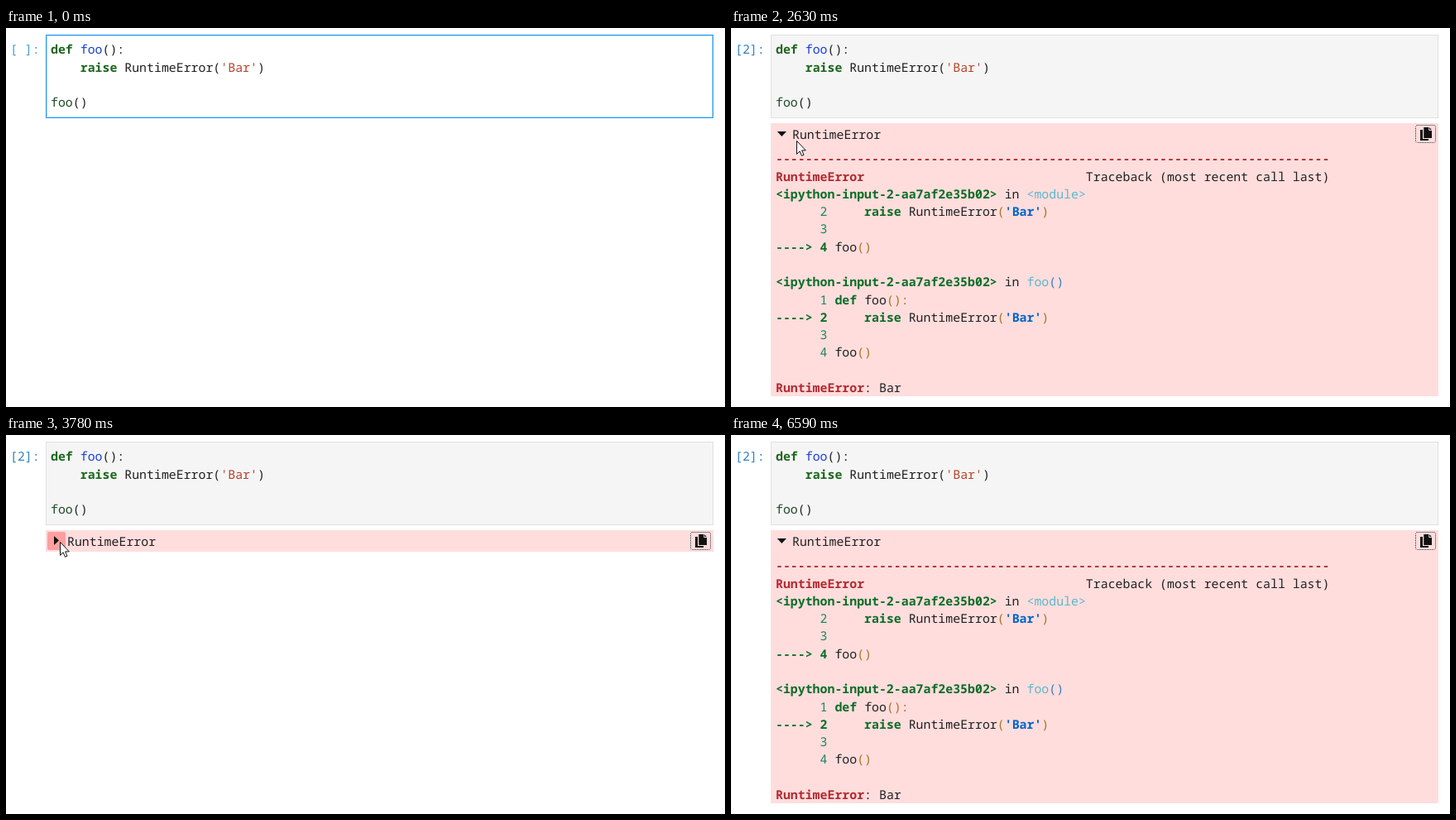
Write an HTML page that moves like this. It is 869 by 458 pixels and loops after 6.94 s.

```html
<!DOCTYPE html>
<html lang="en">
<head>
<meta charset="utf-8">
<title>Collapsible traceback</title>
<style>
html, body { margin: 0; width: 100%; height: 100%; overflow: hidden; background: #fff; }
svg { display: block; }
text { font: 14.88px "Noto Sans Mono", monospace; white-space: pre; fill: #212121; text-rendering: geometricPrecision; }
.k { fill: #1c661c; font-weight: 700; }
.d { fill: #1c3fd8; }
.v { fill: #1f4a2a; }
.s { fill: #b5432b; }
.r { fill: #b22b31; font-weight: 700; }
.g { fill: #0a6e27; font-weight: 700; }
.n { fill: #1c8560; }
.c { fill: #5cb8cc; }
.b { fill: #0065ca; font-weight: 700; }
.p { fill: #2f7fc0; }
.y { fill: #a8741c; }
</style>
</head>
<body>
<svg id="stage" width="869" height="458" viewBox="0 0 869 458">
  <rect id="cell" x="48.5" y="8.5" width="806" height="100"/>
  <rect id="glow" x="49.5" y="9.5" width="804" height="98" fill="none" stroke="#2196f3" stroke-opacity=".3"/>
  <text id="prompt" x="5" y="31"></text>
  <g id="code"></g>
  <g id="output">
    <rect id="panel" x="48" y="115" width="807" height="330" fill="#fdd"/>
    <rect id="toggle" x="50" y="117" width="22" height="22" rx="2"/>
    <path id="mark" fill="#111"/>
    <text x="74" y="134">RuntimeError</text>
    <rect id="copy" x="827.5" y="117.5" width="24" height="21" rx="2" stroke="#fff" stroke-opacity=".6"/>
    <rect x="827.5" y="117.5" width="24" height="21" rx="2" fill="none" stroke="#222" stroke-dasharray="1 1"/>
    <path d="M833 123h3v11h7v2h-10z" fill="#111"/>
    <path d="M837.3 120h6v4h3.7v9h-9.7z" fill="#111"/>
    <path d="M844 120l3 3h-3z" fill="#334"/>
    <g id="trace"></g>
  </g>
  <g id="arrow">
    <path d="M.5 .5V16.4L4.1 12.9L6.5 18.4L9 17.3L6.6 11.9H11.3Z" fill="#fff" stroke="#111"/>
  </g>
  <path id="beam" d="M-3.5 -7.5H-1Q0 -7.5 0 -6.5Q0 -7.5 1 -7.5H3.5M0 -6.5V6.5M-3.5 7.5H-1Q0 7.5 0 6.5Q0 7.5 1 7.5H3.5" fill="none" stroke="#111" stroke-width="1.3"/>
</svg>
<script>
const NS = "http://www.w3.org/2000/svg";
const LOOP = 6940;
const $ = id => document.getElementById(id);
const set = (id, attrs) => {
  for (const name in attrs) $(id).setAttribute(name, attrs[name]);
};
const show = (id, on) => set(id, { visibility: on ? "visible" : "hidden" });

// {x:text} gives the text class x.
function addLine(group, y, source) {
  const text = document.createElementNS(NS, "text");
  text.setAttribute("x", 54);
  text.setAttribute("y", Math.round(y));
  for (const m of source.matchAll(/\{(\w):([^}]*)\}|[^{]+/g)) {
    const span = document.createElementNS(NS, "tspan");
    if (m[1]) span.setAttribute("class", m[1]);
    span.textContent = m[1] ? m[2] : m[0];
    text.append(span);
  }
  $(group).append(text);
}

const code = [
  "{k:def} {d:foo}():",
  "    {k:raise} RuntimeError({s:'Bar'})",
  "",
  "{v:foo}()"
];
const raise = "    {g:raise} RuntimeError{y:(}{b:'Bar'}{y:)}";
const file = "{g:<ipython-input-2-aa7af2e35b02>} in ";
const trace = [
  "{r:" + "-".repeat(75) + "}",
  "{r:RuntimeError}" + " ".repeat(30) + "Traceback (most recent call last)",
  file + "{c:<module>}",
  "{n:      2} " + raise,
  "{n:      3}",
  "{g:----> 4} foo{y:()}",
  "",
  file + "{c:foo}{p:()}",
  "{n:      1} {g:def} foo{y:():}",
  "{g:----> 2} " + raise,
  "{n:      3}",
  "{n:      4} foo{y:()}",
  "",
  "{r:RuntimeError}: Bar"
];
code.forEach((s, i) => addLine("code", 31.4 + 21.28 * i, s));
trace.forEach((s, i) => addLine("trace", 163.3 + 21.28 * i, s));

// Smooth curve through evenly timed points.
function along(points, p) {
  const last = points.length - 1;
  const u = Math.min(Math.max(p, 0), 1) * last;
  const i = Math.min(Math.floor(u), last - 1);
  const f = u - i;
  const at = j => points[Math.min(Math.max(j, 0), last)];
  return [0, 1].map(n => {
    const [a, b, c, d] = [at(i - 1)[n], at(i)[n], at(i + 1)[n], at(i + 2)[n]];
    return b + f / 2 * (c - a + f * (2 * a - 5 * b + 4 * c - d + f * (3 * (b - c) + d - a)));
  });
}

const enter = [[765, 405], [668, 288], [535, 150], [452, 76], [429, 67], [432, 74]];
const toToggle = [[432, 74], [375, 85], [230, 126], [112, 157], [79, 136], [66, 131]];
const toCopy = [[65, 129], [110, 165], [270, 204], [480, 210], [690, 175], [828, 137]];
const leave = [[839, 133], [843, 180], [849, 270], [851, 370], [849, 462]];
const step = (t, start, size) => Math.floor((t - start) / size);

function pointerAt(t) {
  if (t < 120 || t >= 6590) return null;
  if (t < 2140) return along(enter, step(t, 120, 75.5) / 9);
  if (t < 2900) return along(toToggle, (step(t, 2140, 70) + 1) / 10);
  if (t < 4310) return [65, 129];
  if (t < 5010) return along(toCopy, (step(t, 4310, 70) + 1) / 10);
  if (t < 5080) return [835, 135];
  if (t < 6030) return [839, 133];
  return along(leave, (step(t, 6030, 70) + 1) / 9);
}

function draw(t) {
  const ran = t >= 1390;
  const open = t < 3180 || t >= 3850;
  const pos = pointerAt(t);
  const [x, y] = pos || [-50, -50];
  const inside = (l, top, r, b) => x >= l && x < r && y >= top && y < b;
  const tint = (hover, pressed) => pressed ? "#ff9f9f" : hover ? "#ffb3b3" : "#fdd";

  set("cell", { fill: ran ? "#f5f5f5" : "#fff", stroke: ran ? "#e0e0e0" : "#2196f3" });
  show("glow", !ran);
  $("prompt").textContent = ran ? "[2]:" : "[ ]:";
  $("prompt").style.fill = ran ? "#307fc1" : "#429fd4";

  set("output", { display: ran ? "inline" : "none" });
  set("panel", { height: open ? 330 : 26 });
  set("trace", { display: open ? "inline" : "none" });
  set("mark", { d: open ? "M55.8 125H67L61.4 131Z" : "M58 122V133L64 127.5Z" });
  set("toggle", { fill: tint(inside(50, 117, 72, 139), t >= 3100 && t < 3250 || t >= 3780 && t < 3850) });
  set("copy", { fill: tint(inside(827, 117, 852, 137), t >= 5350 && t < 5500) });

  const overText = inside(48, 8, 855, 109) || ran && open && inside(54, 148, 724, 445);
  const place = { transform: `translate(${Math.round(x)} ${Math.round(y)})` };
  set("arrow", place);
  set("beam", place);
  show("arrow", pos && !overText);
  show("beam", pos && overText);
}

function tick() {
  draw(performance.now() % LOOP);
  requestAnimationFrame(tick);
}
tick();
</script>
</body>
</html>
```
